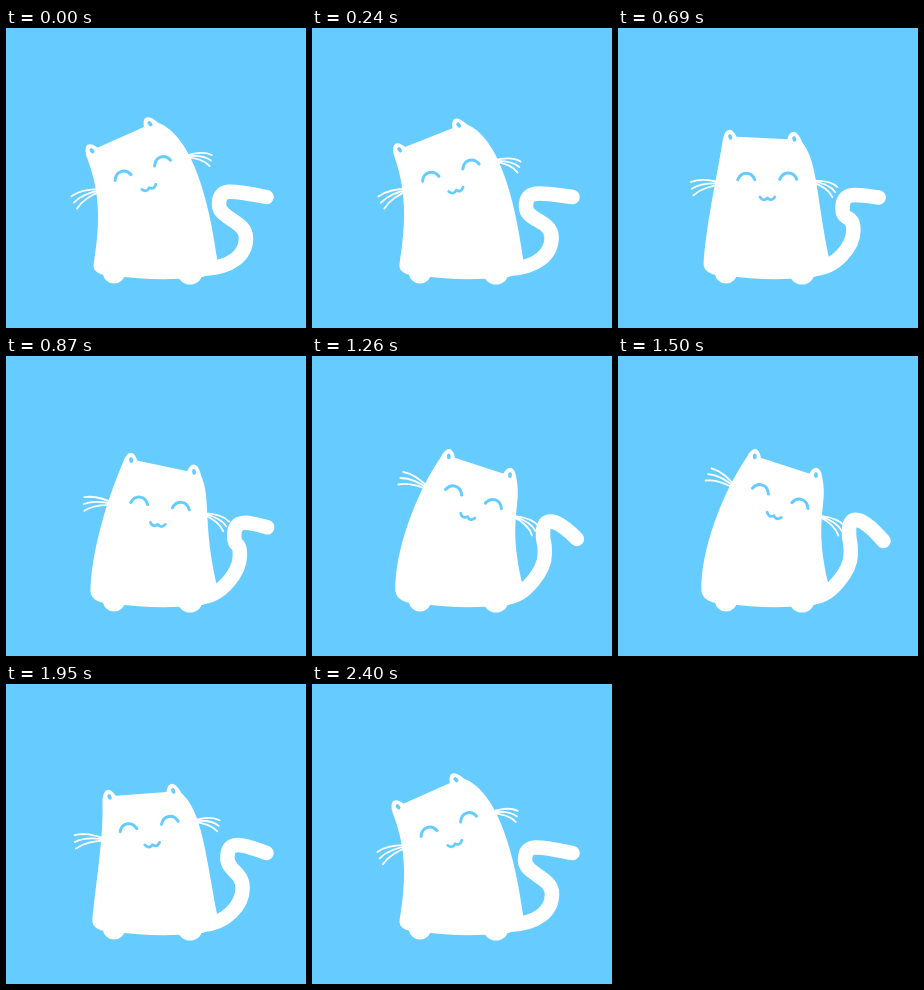
Recreate the animation shown at these times as an HTML page with a canvas. Size 300 by 300 pixels, loop 2.43 s.

```html
<!DOCTYPE html>
<html lang="en">
<head>
<meta charset="utf-8">
<title>Swaying cat</title>
<style>
  html, body { margin: 0; height: 100%; overflow: hidden; background: #6cf; }
  canvas { display: block; width: 100vw; height: 100vh; }
</style>
</head>
<body>
<canvas id="stage" width="300" height="300"></canvas>
<script>
const ctx = document.getElementById('stage').getContext('2d');
const BLUE = '#6cf', WHITE = '#fff', LOOP = 2430, DEG = Math.PI / 180;

function ease(t, start, end) {
  const u = Math.min(1, Math.max(0, (t - start) / (end - start)));
  return u * u * (3 - 2 * u);
}

// Slow wave over one loop, highest at the given time
const wave = (t, peak) => Math.cos((t - peak) / LOOP * 2 * Math.PI);

function fill(path) {
  ctx.fillStyle = WHITE;
  ctx.fill(new Path2D(path));
}

function stroke(path, width, color = WHITE) {
  ctx.lineWidth = width;
  ctx.strokeStyle = color;
  ctx.stroke(new Path2D(path));
}

function placed(x, y, angle, paint) {
  ctx.save();
  ctx.translate(x, y);
  ctx.rotate(angle * DEG);
  paint();
  ctx.restore();
}

function drawTail(bendX, bendY, tipX, tipY) {
  const x = 240 - (bendX - 213) * 0.4, bulge = x - 233, y = 198 + bulge * 1.7;
  stroke(`M196 241C${213 + bulge * 1.8} 240 ${x} ${y + 17} ${x} ${y}
    C${x} ${y - 17} ${bendX} ${bendY + 24} ${bendX} ${bendY + 10}
    C${bendX} ${bendY - 8} ${bendX + 14} ${bendY - 4} ${tipX} ${tipY}`, 14.5);
}

function drawEar(x, y, tilt) {
  placed(x, y, tilt, () => {
    fill('M-7 9C-5 -3 2 -5 8 9L0 14Z');
    stroke('M0 5.5L.6 7.5', 3.6, BLUE);
  });
}

// The feet stay put while the sides bend to follow the head
function drawBody(headX, headY, tilt) {
  const c = Math.cos(tilt * DEG), s = Math.sin(tilt * DEG);
  const at = (dx, dy) => [headX + dx * c - dy * s, headY + dx * s + dy * c];
  const left = at(-39, 9), right = at(40, 9);
  const [x, y] = left, [X, Y] = right, lean = X - 155;
  fill(`M${left}L${at(-25, 6)}L${at(26, 7)}L${right}
    C${X + 31 - lean * 0.52} ${Y + 13 + lean * 0.25} ${202 - lean * 0.14} 167 211 230
    Q211 248 190 250Q145 253 110 248Q85 248 ${95 - x * 0.09} 235
    C${92 - (x - 90) * 0.25} 195 ${x + (98 - x) * 0.8} ${y + 36} ${left}Z`);
  drawEar(...at(-32, 0), tilt);
  drawEar(...at(32, 0), tilt);
  fill('M97 245a11 10.5 0 0 0 22 0a11 10.5 0 0 0 -22 0M172 246a12 10.5 0 0 0 24 0a12 10.5 0 0 0 -24 0');
}

function drawWhiskers(side, droop, length) {
  placed(side * 51, 7, side * droop, () => {
    ctx.scale(side, 1);
    for (const fan of [-1, 0, 1]) {
      placed(0, fan * 2, fan * 11, () => stroke(`M-8 1Q${length / 2} -5 ${length} 0`, 1.8));
    }
  });
}

function drawFace(x, y, angle, t) {
  placed(x, y, angle, () => {
    drawWhiskers(-1, 2 + 9 * wave(t, 480), 25);
    drawWhiskers(1, 24 + 8 * wave(t, 240), 19);
    for (const side of [-21, 21]) {
      placed(side, 0, 0, () => stroke('M-8.5 2.5C-5 -6 5 -6 8.5 2.5', 3, BLUE));
    }
    stroke('M-7.5 20Q-4 25 0 21Q4 25 7.5 20', 2.8, BLUE);
  });
}

function draw(now) {
  const t = now % LOOP;
  const sway = ease(t, 110, 1180) - ease(t, 1500, 2290);
  const rise = ease(t, 0, 1400), look = rise - ease(t, 1580, 2130);
  const turn = sway * (1.3 - 0.3 * sway), flick = look ** 5;

  ctx.fillStyle = BLUE;
  ctx.fillRect(0, 0, 300, 300);
  ctx.lineCap = ctx.lineJoin = 'round';
  drawTail(213 + 18 * turn, 167 + 3.5 * wave(t, 650), 260.5 + 5 * flick, 169 + 16 * flick);
  drawBody(112 + 57 * sway, 103.5, -25 + 42 * turn);
  drawFace(136 + 27 * look, 140 + 9 * Math.sin(Math.PI * rise), -20 + 40 * look, t);
  requestAnimationFrame(draw);
}
requestAnimationFrame(draw);
</script>
</body>
</html>
```
